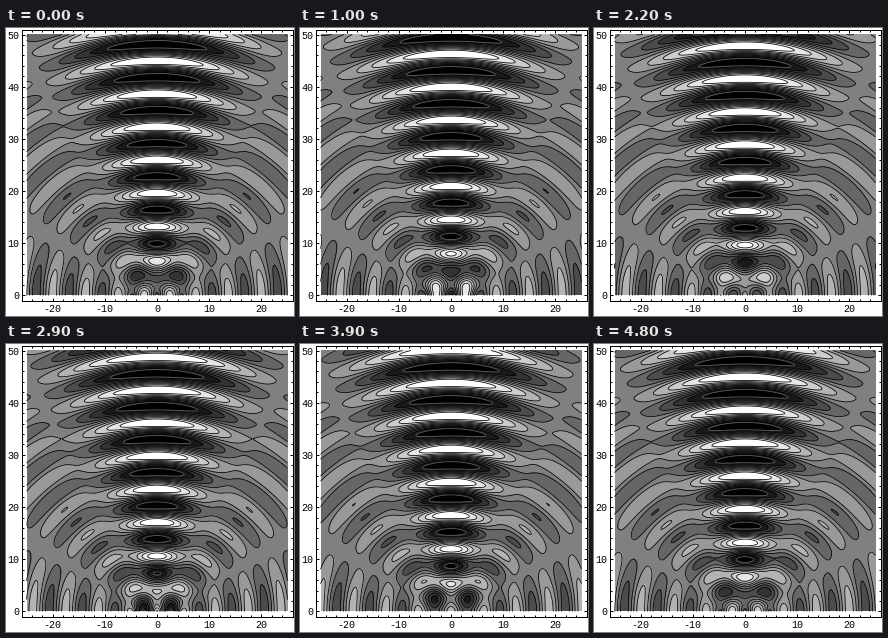
Write a matplotlib script that moves like this. It is 288 px wide and 288 px high and loops after 4.9 s.

```python
import matplotlib.pyplot as plt
import numpy as np
from matplotlib.animation import FuncAnimation
from matplotlib.ticker import MultipleLocator

SIZE, DPI = 288, 72
FRAMES, INTERVAL = 49, 100
SPACING = 4.65          # distance between neighbouring emitters
CENTRE = 1.25           # strength of the middle one, the outer two are 1
START = 1.14            # phase at the start of the loop
PEAK = 3.0              # value shown as full white
BAND = 2 * PEAK / 11    # eleven grey bands, the middle one around zero
LEVELS = (np.arange(10) - 4.5) * BAND
LINE_COLORS = ["0.4"] + ["black"] * 9   # the lowest line lies inside black

plt.rcParams["font.family"] = "Liberation Mono"

xs = np.linspace(-25, 25, 261)
ys = np.linspace(0, 50, 261)
X, Y = np.meshgrid(xs, ys)


def wave(x0):
    return np.exp(1j * np.hypot(X - x0, Y))


waves = wave(-SPACING) + CENTRE * wave(0) + wave(SPACING)


def field(i):
    phase = START + 2 * np.pi * i / (FRAMES - 1)
    return (waves * np.exp(-1j * phase)).real


def bands(z):
    return np.clip(np.rint(z / BAND), -5, 5)


fig = plt.figure(figsize=(SIZE / DPI, SIZE / DPI), dpi=DPI, facecolor="white")
left, right, top, bottom = 15.5, 286.5, 1.5, 272.5
ax = fig.add_axes([left / SIZE, 1 - bottom / SIZE,
                   (right - left) / SIZE, (bottom - top) / SIZE])

image = ax.imshow(bands(field(0)), cmap="gray", vmin=-5, vmax=5,
                  origin="lower", extent=(-25, 25, 0, 50),
                  interpolation="nearest", aspect="auto")
ax.set_xlim(-25.96, 25.96)
ax.set_ylim(-0.96, 50.96)

for axis in (ax.xaxis, ax.yaxis):
    axis.set_major_locator(MultipleLocator(10))
    axis.set_minor_locator(MultipleLocator(2))
    axis.set_major_formatter(lambda v, _: f"{v:.0f}")
ax.xaxis.set_major_locator(MultipleLocator(10))
ax.tick_params(which="both", direction="in", top=True, right=True, width=1)
ax.tick_params(which="major", length=3, labelsize=10)
ax.tick_params(which="minor", length=2)
ax.tick_params(axis="x", pad=4)
ax.tick_params(axis="y", pad=2)
for spine in ax.spines.values():
    spine.set_linewidth(1)

lines = None


def draw(i):
    global lines
    z = field(i)
    image.set_data(bands(z))
    if lines is not None:
        lines.remove()
    lines = ax.contour(xs, ys, z, levels=LEVELS, colors=LINE_COLORS,
                       linestyles="solid", linewidths=0.75, antialiased=True)
    return [image, lines]


anim = FuncAnimation(fig, draw, frames=FRAMES, interval=INTERVAL,
                     repeat=True, repeat_delay=0, blit=False)
plt.show()
```
